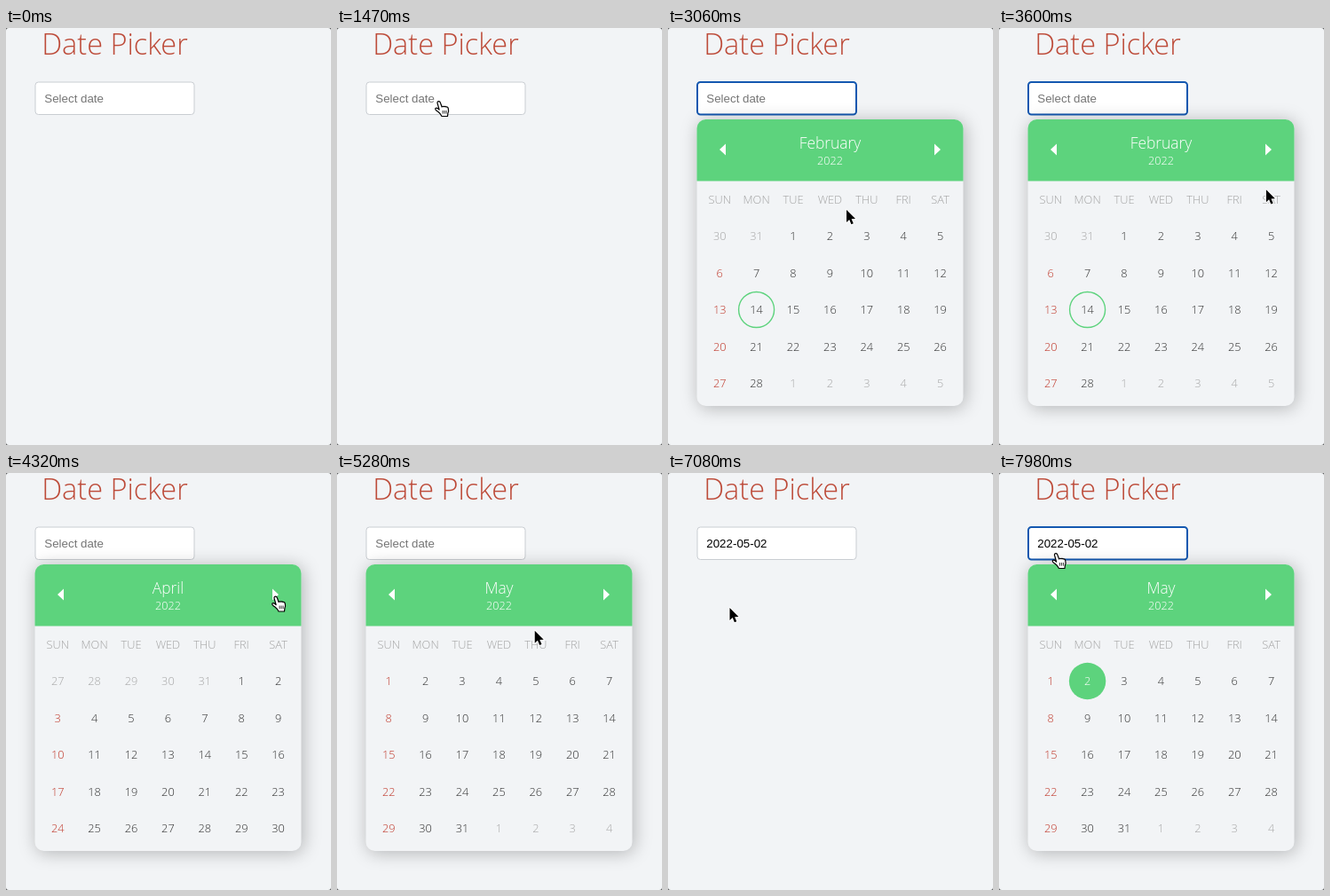
An HTML page with a canvas for the animation above (8 s loop, 366 by 470 pixels).

```html
<!DOCTYPE html>
<html lang="en">
<head>
<meta charset="utf-8">
<title>Date Picker</title>
<style>
  html, body { margin: 0; width: 100%; height: 100%; overflow: hidden; background: #555; }
  canvas { display: block; }
</style>
</head>
<body>
<canvas id="stage" width="366" height="470"></canvas>
<script>
const ctx = document.getElementById('stage').getContext('2d');
const LOOP = 8000, PAGE = '#f2f4f6', GREEN = '#5dd37d', RED = '#c0392b';
const SANS = '"Open Sans", sans-serif', ARIAL = '"Liberation Sans", Arial, sans-serif';
const MONTHS = ['January', 'February', 'March', 'April', 'May'];
const DAYS = ['SUN', 'MON', 'TUE', 'WED', 'THU', 'FRI', 'SAT'];
const PITCH = 41.4, COL0 = 58.2, ROW0 = 235, RADIUS = 20.7;

// Pointer path: time, x, y
const PATH = [
  [330, 168, 470], [810, 114.5, 83], [1470, 114.5, 83], [1560, 134.5, 83],
  [2250, 134.5, 83], [3030, 161, 205], [3060, 201, 205], [3330, 296, 262],
  [3780, 303.5, 139.5], [5010, 303.5, 139.5], [5640, 99.5, 236],
  [6990, 99.5, 236], [7080, 69.5, 152], [7200, 54, 84], [7410, 64, 91], [LOOP, 64, 91]
];

const HAND = new Path2D('M-1.6 1.2Q-1.4-.6 .4-.4Q1.6-.2 2 1.5L3.6 6Q4.4 4.8 6 5.6Q7.4 5 8.4 6' +
  'Q10.4 5.6 10.8 8Q11.6 11 10.4 13L10 16.5H3.5Q2 13.5-.5 11.6Q-4.5 9-3.6 7.6Q-2 6.4 .6 9Z');
const FINGERS = new Path2D('M4.6 10v3.6M6.6 10v3.6M8.6 10v3.6');
const ARROW = new Path2D('M0 0V14L3.2 11L5.4 16.2L7.8 15.2L5.6 10.2L10 10Z');

function text(str, x, y, font, color, align = 'center') {
  ctx.font = font;
  ctx.fillStyle = color;
  ctx.textAlign = align;
  ctx.fillText(str, x, y);
}

function box(x, y, w, h, r) {
  ctx.beginPath();
  ctx.roundRect(x, y, w, h, r);
}

function fill(color) { ctx.fillStyle = color; ctx.fill(); }

function stroke(color, width) {
  ctx.strokeStyle = color;
  ctx.lineWidth = width;
  ctx.stroke();
}

function pointerAt(t) {
  const i = PATH.findIndex(p => p[0] > t);
  if (i < 1) return null;
  const [t0, x0, y0] = PATH[i - 1], [t1, x1, y1] = PATH[i];
  const u = (t - t0) / (t1 - t0), e = u * u * (3 - 2 * u);
  return { x: x0 + (x1 - x0) * e, y: y0 + (y1 - y0) * e };
}

function drawInput(focused, value) {
  box(33, 61, 179, 36.5, 3.5);
  fill('#fff');
  stroke(focused ? '#1458b0' : '#c9cdd2', focused ? 2 : 1);
  text(value || 'Select date', 43.3, 83.7, '13.333px ' + ARIAL, value ? '#000' : '#757575', 'left');
}

function triangle(x, dir) {
  ctx.beginPath();
  ctx.moveTo(x, 137);
  ctx.lineTo(x - 7 * dir, 130.5);
  ctx.lineTo(x - 7 * dir, 143.5);
  fill('#fff');
}

function drawCalendar(month, hover, picked) {
  ctx.save();
  ctx.shadowColor = 'rgba(0,0,0,.27)';
  ctx.shadowBlur = 20;
  ctx.shadowOffsetX = ctx.shadowOffsetY = 2;
  box(32.5, 103, 300, 323, 10);
  fill(PAGE);
  ctx.restore();

  box(32.5, 103, 300, 69.5, [10, 10, 0, 0]);
  fill(GREEN);
  text(MONTHS[month], 182.5, 136, '300 17.4px ' + SANS, '#fff');
  text('2022', 182.5, 154, '300 12.6px ' + SANS, '#fff');
  triangle(58, -1);
  triangle(307, 1);

  const font = '300 12.8px ' + SANS;
  DAYS.forEach((d, i) => text(d, COL0 + i * PITCH, 198.3, font, '#a3a3a3'));
  const lead = new Date(2022, month, 1).getDay();
  for (let i = 0; i < 35; i++) {
    const date = new Date(2022, month, 1 - lead + i);
    const day = date.getDate(), inMonth = date.getMonth() === month;
    const x = COL0 + i % 7 * PITCH, y = ROW0 + Math.floor(i / 7) * PITCH;
    const filled = i === hover || picked && inMonth && day === 2;
    let color = !inMonth ? '#a8a8a8' : i % 7 ? '#333' : RED;
    ctx.beginPath();
    if (filled) {
      ctx.arc(x, y - .5, RADIUS, 0, 7);
      fill(GREEN);
      color = '#fff';
    } else if (month === 1 && inMonth && day === 14) {
      ctx.arc(x, y - .3, RADIUS - .7, 0, 7);
      stroke(GREEN, 1.4);
    }
    text(day, x, y + 4.4, font, color);
  }
}

function cellUnder(p) {
  const col = Math.round((p.x - COL0) / PITCH), row = Math.round((p.y - ROW0) / PITCH);
  const inside = col >= 0 && col < 7 && row >= 0 && row < 5;
  return inside ? row * 7 + col : -1;
}

function drawPointer(p, hand) {
  ctx.save();
  ctx.translate(p.x, p.y);
  ctx.lineJoin = 'round';
  if (hand) {
    ctx.fillStyle = '#fff';
    ctx.fill(HAND);
    ctx.strokeStyle = '#000';
    ctx.lineWidth = 1.2;
    ctx.stroke(HAND);
    ctx.lineWidth = .8;
    ctx.stroke(FINGERS);
  } else {
    ctx.strokeStyle = '#fff';
    ctx.lineWidth = 2;
    ctx.stroke(ARROW);
    ctx.fillStyle = '#000';
    ctx.fill(ARROW);
  }
  ctx.restore();
}

function draw(now) {
  const t = now % LOOP;
  const picked = t >= 6510;
  const open = t >= 1800 && !picked || t >= 7590;
  const focused = t >= 1800 && t < 3840 || t >= 7590;
  const month = t < 3870 ? 1 : t < 4230 ? 2 : t < 4680 ? 3 : 4;
  const p = pointerAt(t);
  const hover = open && p ? cellUnder(p) : -1;

  ctx.clearRect(0, 0, 366, 470);
  box(0, 0, 366, 470, 3);
  fill(PAGE);
  text('Date Picker', 122.5, 29.7, '300 32.5px ' + SANS, '#bd4b39');
  drawInput(focused, picked ? '2022-05-02' : '');
  if (open) drawCalendar(month, hover, picked);
  if (p) {
    const onInput = p.x > 32 && p.x < 213 && p.y > 60 && p.y < 98;
    const onNext = open && p.x > 292 && p.x < 316 && p.y > 125 && p.y < 150;
    drawPointer(p, onInput || onNext || hover >= 0);
  }
  requestAnimationFrame(draw);
}
requestAnimationFrame(draw);
</script>
</body>
</html>
```
